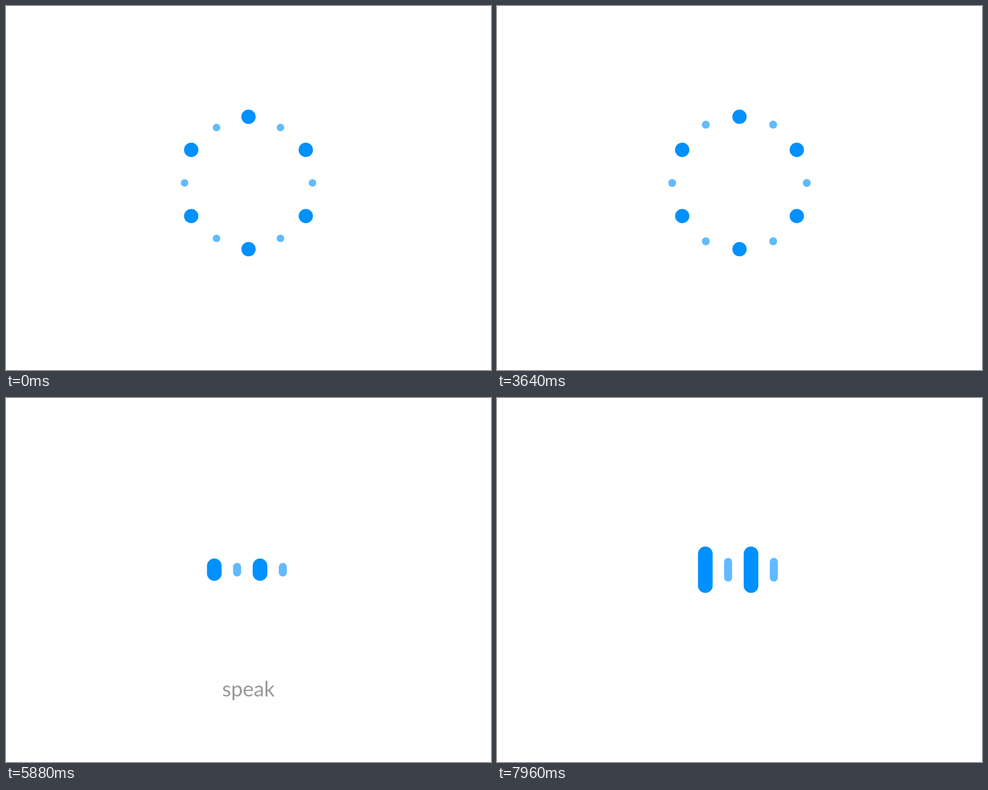
An HTML page for the animation above (8 s loop, 800x600 px).

```html
<!DOCTYPE html>
<html lang="en">
<head>
<meta charset="utf-8">
<title>Voice indicator</title>
<style>
  html, body { margin: 0; width: 100%; height: 100%; overflow: hidden; background: #fff; }
  svg { display: block; width: 100vw; height: 100vh; }
  text { font: 34.3px Lato, "Open Sans", sans-serif; fill: #999; text-anchor: middle; }
</style>
</head>
<body>
<svg id="stage" viewBox="0 0 800 600"><text id="label" x="399.8" y="492">speak</text></svg>
<script>
const LOOP = 8000, CX = 400, CY = 291.7, MID = 283;
const GATHER = 4200, GATHERED = 4840, BIG_START = 4888, SMALL_START = 5216;
const BIG = { color: '#0090ff', size: 24.2, grow: 66, period: 1160, start: BIG_START };
const SMALL = { color: '#61baff', size: 13.2, grow: 47, period: 580, start: SMALL_START };

// Breathing radius of each ring: [time, radius]
BIG.keys = [[0, 109.1], [390, 112.7], [780, 114], [1170, 112.7], [1560, 109.1], [2080, 102.5],
  [2600, 100], [3120, 102.3], [3360, 105], [3640, 109.1], [3960, 114], [4200, 111.5]];
SMALL.keys = [[0, 105.5], [400, 111.5], [810, 113.7], [1200, 111.5], [1560, 106.8], [2000, 100],
  [2500, 96], [3000, 99.5], [3360, 105.3], [3640, 111], [3840, 113.7], [4200, 101]];

// Ring slots that fly to the row: point passed halfway, resting x
const flights = {
  10: { via: [317, 253], x: 343.6 },
  7: { via: [344.3, 335.8], x: 381.2 },
  6: { via: [387, 313.3], x: 419 },
  5: { via: [416, 317.8], x: 456.6 }
};

const clamp = v => Math.min(1, Math.max(0, v));
const span = (t, a, b) => clamp((t - a) / (b - a));
const ease = u => (1 - Math.cos(Math.PI * u)) / 2;
const mix = (a, b, u) => a + (b - a) * u;

// Smooth curve through the keys
function curve(keys, t) {
  const last = keys.length - 1;
  let i = 0;
  while (i < last - 1 && t > keys[i + 1][0]) i++;
  const slope = k => {
    const a = keys[Math.max(0, k - 1)], b = keys[Math.min(last, k + 1)];
    return (b[1] - a[1]) / (b[0] - a[0]);
  };
  const [t0, v0] = keys[i], [t1, v1] = keys[i + 1];
  const d = t1 - t0, u = clamp((t - t0) / d), w = 1 - u;
  return w * w * (1 + 2 * u) * v0 + u * u * (3 - 2 * u) * v1
    + d * u * w * (w * slope(i) - u * slope(i + 1));
}

const stage = document.getElementById('stage');
const label = document.getElementById('label');
const dots = Array.from({ length: 12 }, (_, i) => {
  const el = document.createElementNS('http://www.w3.org/2000/svg', 'rect');
  const kind = i % 2 ? SMALL : BIG;
  el.setAttribute('fill', kind.color);
  stage.append(el);
  return { el, kind, angle: i * Math.PI / 6, flight: flights[i] };
});

function pill(el, x, y, w, h, opacity) {
  const box = { x: x - w / 2, y: y - h / 2, width: w, height: h, rx: w / 2, opacity };
  for (const key in box) el.setAttribute(key, box[key]);
}

function drawDot({ el, kind, angle, flight }, t) {
  const ring = curve(kind.keys, Math.min(t, GATHER));
  const size = kind.size * ring / 112;
  const at = r => [CX + r * Math.sin(angle), CY - r * Math.cos(angle)];
  if (t <= GATHER) return pill(el, ...at(ring), size, size, 1);

  if (!flight) {
    const u = span(t, GATHER, 4440);
    return pill(el, ...at(ring * (1 - 0.6 * ease(u))), size, size, 1 - u);
  }
  if (t < GATHERED) {
    const u = ease(span(t, GATHER, GATHERED)), w = 1 - u;
    const end = [flight.x, MID];
    const [x, y] = at(ring).map((s, k) => {
      const bend = 2 * flight.via[k] - (s + end[k]) / 2;
      return w * w * s + 2 * u * w * bend + u * u * end[k];
    });
    const d = mix(size, kind.size, clamp(u * 2));
    return pill(el, x, y, d, d, 1);
  }
  const beat = Math.max(0, t - kind.start) / kind.period;
  pill(el, flight.x, MID, kind.size, kind.size + kind.grow * ease(2 * beat), 1);
}

function drawLabel(t) {
  const enter = ease(span(t, 4920, 5800)), leave = ease(span(t, 7260, 7820));
  const sway = 3 * Math.sin(Math.PI * span(t, 5880, 7240));
  label.setAttribute('y', 492 + 40 * (1 - enter) + sway - 22 * leave);
  label.setAttribute('opacity', span(t, 4920, 5500) * (1 - leave));
}

function draw(t) {
  dots.forEach(dot => drawDot(dot, t));
  drawLabel(t);
}

const begin = performance.now();
function tick() {
  draw((performance.now() - begin) % LOOP);
  requestAnimationFrame(tick);
}
tick();
</script>
</body>
</html>
```
